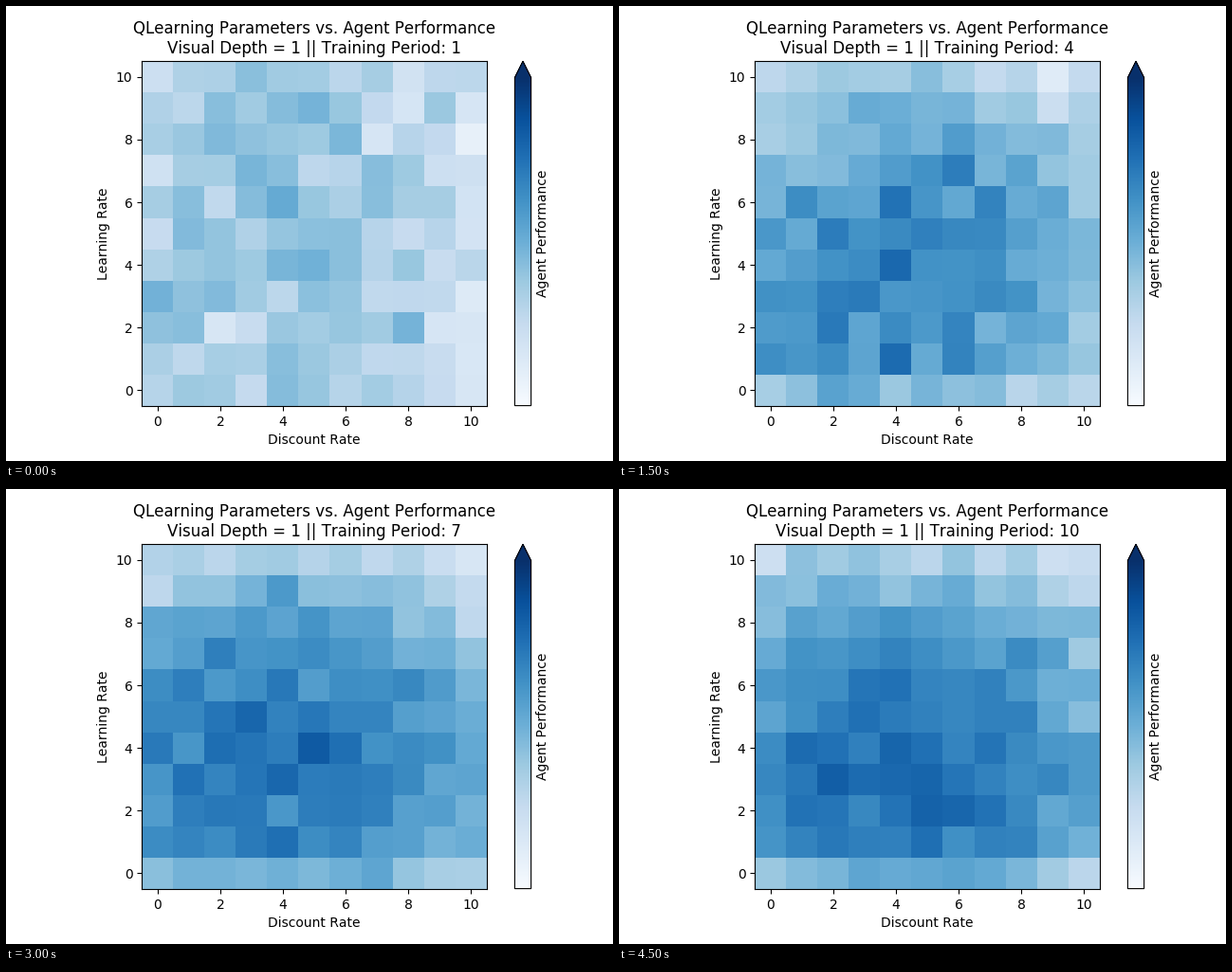
A matplotlib script that plays this animation: 640 by 480 pixels, repeating every 5 s.

```python
import numpy as np
import matplotlib.pyplot as plt
from matplotlib.animation import FuncAnimation

W, H, DPI = 640, 480, 100
N = 11
PERIODS = 10
STEP_MS = 500

plt.rcParams["font.family"] = "DejaVu Sans"
plt.rcParams["text.kerning_factor"] = 6


def scores(period):
    """Performance grid, 0 to 100, indexed [learning rate, discount rate]."""
    y, x = np.mgrid[:N, :N]
    trained = 1 - np.exp(-(period - 1) / 2.7)

    start = 30 + 6 * np.sin(np.pi * y / 10)
    gain = 38 * (1 - (y / 10) ** 3)
    gain[0] *= 0.45  # hardly any progress without a learning rate
    discount = 6.3 - 0.57 * (x - 4) ** 2

    spread = 8 - 3 * trained
    noise = np.random.default_rng(period).normal(0, spread, (N, N))
    return np.clip(start + gain * trained + discount + noise, 0, 100)


def box(left, top, right, bottom):
    return [left / W, 1 - bottom / H, (right - left) / W, (bottom - top) / H]


fig = plt.figure(figsize=(W / DPI, H / DPI), dpi=DPI)
ax = fig.add_axes(box(143.2, 58.2, 507, 422))
image = ax.imshow(scores(1), cmap="Blues", vmin=0, vmax=100, origin="lower",
                  aspect="auto", interpolation="nearest")
ax.set_xticks(range(0, N, 2))
ax.set_yticks(range(0, N, 2))
ax.set_xlabel("Discount Rate")
ax.set_ylabel("Learning Rate")

cax = fig.add_axes(box(536.4, 58.2, 553.6, 421.6))
bar = fig.colorbar(image, cax=cax, extend="max")
bar.set_ticks([])
fig.text(559 / W, 0.5, "Agent Performance", rotation=90,
         ha="left", va="center")


def draw(i):
    image.set_data(scores(i + 1))
    title = ax.set_title("QLearning Parameters vs. Agent Performance\n"
                         f"Visual Depth = 1 || Training Period: {i + 1}")
    return image, title


anim = FuncAnimation(fig, draw, frames=PERIODS, interval=STEP_MS,
                     init_func=lambda: draw(0), repeat=True, repeat_delay=0)
plt.show()
```
